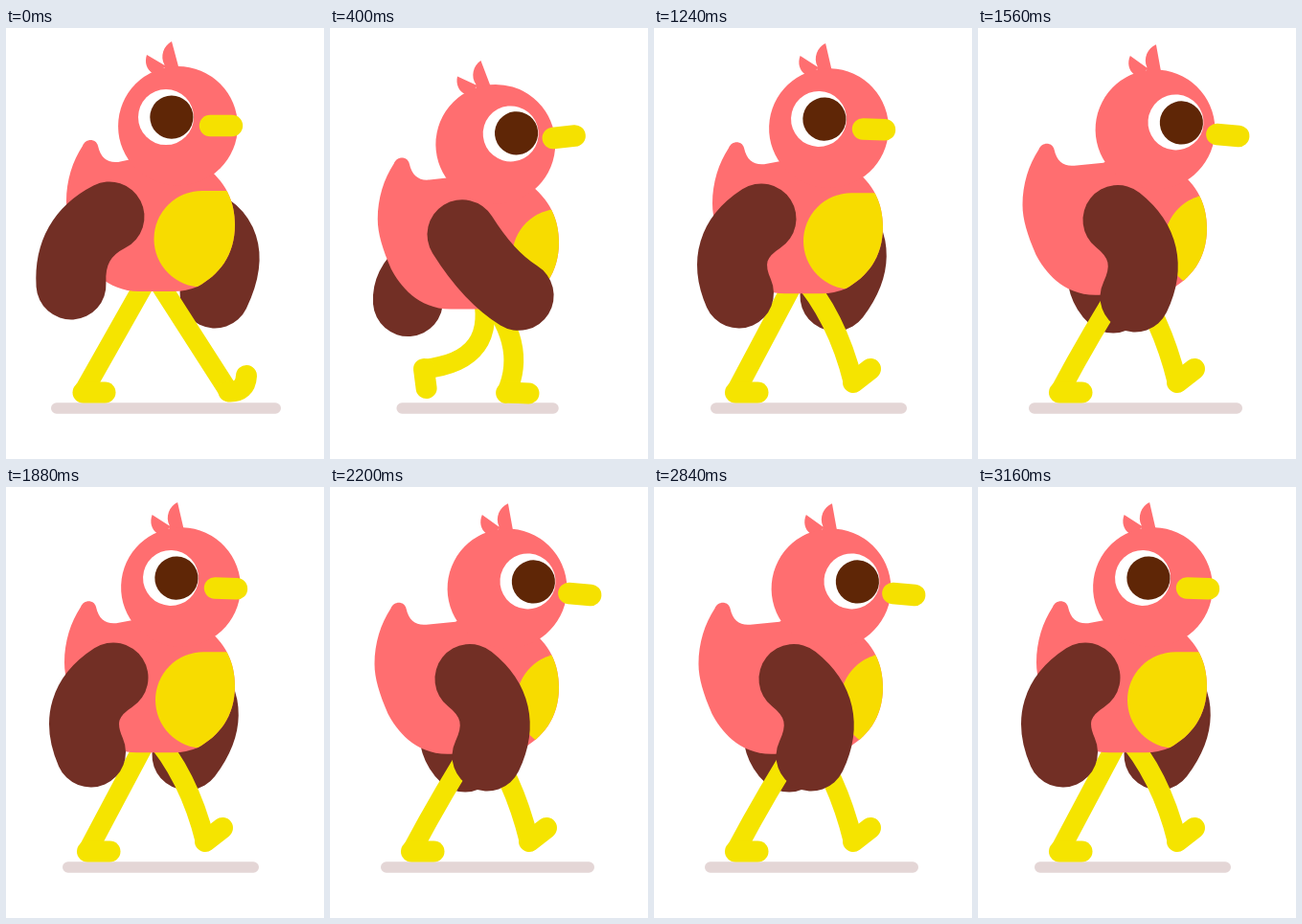
An HTML page for the animation above (3.2 s loop, 332 by 450 pixels).

```html
<!DOCTYPE html>
<html lang="en">
<head>
<meta charset="utf-8">
<title>Walking bird</title>
<style>
  html, body { margin: 0; width: 100%; height: 100%; overflow: hidden; background: #fff; }
  svg { display: block; width: 100vw; height: 100vh; }
  .line { fill: none; stroke-linecap: round; stroke-linejoin: round; }
  .wing { stroke: #722f25; stroke-width: 73; }
  .leg { stroke: #f5e400; stroke-width: 20.5; }
  .foot { stroke: #f5e400; stroke-width: 22; }
  .pink { fill: #ff6e70; }
</style>
</head>
<body>
<svg viewBox="0 0 332 450">
  <clipPath id="torsoClip"><path id="torsoEdge"/></clipPath>
  <rect id="shadow" y="391.3" height="11.4" rx="5.7" fill="#e4d6d6"/>
  <path id="farWing" class="line wing"/>
  <path id="legA" class="line leg"/><path id="footA" class="line foot"/>
  <path id="legB" class="line leg"/><path id="footB" class="line foot"/>
  <g id="body">
    <path id="torso" class="pink"/>
    <g clip-path="url(#torsoClip)">
      <rect id="belly" y="170" width="180" height="100.5" rx="50.2" fill="#f7dc00"/>
    </g>
  </g>
  <path id="nearWing" class="line wing"/>
  <g id="head">
    <path class="pink" d="M-6.5-88.5 1.7-58-14-58V-64C-19-73-15-84-6.5-88.5Z
      M-32.5-74.5-13-63-22-52-26-55C-33-59-35-67-32.5-74.5Z"/>
    <circle class="pink" r="62.4"/>
    <g id="eye">
      <circle cy="-9.3" r="29" fill="#fff"/>
      <circle cx="5.9" cy="-9.3" r="22.6" fill="#5f2606"/>
    </g>
    <rect id="beak" x="-22.7" y="-11.7" width="45.4" height="22.6" rx="11.3" fill="#f5e100"/>
  </g>
</svg>
<script>
const CYCLE = 640, STEP = 40;
const POSES = [0, 120, 280, 600];
const $ = id => document.getElementById(id);
const set = (id, attrs) => {
  for (const k in attrs) $(id).setAttribute(k, attrs[k]);
};

// Harmonics: a bounce repeats with each step, a swing with each pair of steps.
const angle = t => t / CYCLE * 2 * Math.PI;
const bounceBasis = t => [1, Math.cos(angle(t)), Math.cos(2 * angle(t)), Math.sin(2 * angle(t))];
const swingBasis = t => [1, Math.cos(angle(t)), Math.sin(angle(t)), Math.cos(2 * angle(t))];

function solve(rows) {
  const n = rows.length;
  for (let i = 0; i < n; i++) {
    let p = i;
    for (let j = i + 1; j < n; j++) if (Math.abs(rows[j][i]) > Math.abs(rows[p][i])) p = j;
    [rows[i], rows[p]] = [rows[p], rows[i]];
    rows[i] = rows[i].map(v => v / rows[i][i]);
    for (let j = 0; j < n; j++) {
      if (j === i) continue;
      const f = rows[j][i];
      rows[j] = rows[j].map((v, k) => v - f * rows[i][k]);
    }
  }
  return rows.map(r => r[n]);
}

// A smooth wave through the values at the four POSES.
const wave = basis => (...vals) => {
  const w = solve(POSES.map((t, i) => [...basis(t), vals[i]]));
  return t => basis(t).reduce((sum, b, i) => sum + b * w[i], 0);
};
const bounce = wave(bounceBasis), swing = wave(swingBasis);

// Periodic Hermite curve through rows of [time, ...values].
function track(keys) {
  const n = keys.length;
  const key = i => {
    const lap = Math.floor(i / n), k = keys[i - lap * n];
    return [k[0] + lap * CYCLE, ...k.slice(1)];
  };
  return time => {
    const t = time % CYCLE;
    let i = n - 1;
    while (keys[i][0] > t) i--;
    const [a, b, c, d] = [key(i - 1), key(i), key(i + 1), key(i + 2)];
    const h = c[0] - b[0], u = (t - b[0]) / h, v = 1 - u;
    return b.slice(1).map((_, j) => {
      const k = j + 1;
      const m0 = (c[k] - a[k]) / (c[0] - a[0]) * h;
      const m1 = (d[k] - b[k]) / (d[0] - b[0]) * h;
      return b[k] * (1 + 2 * u) * v * v + m0 * u * v * v + c[k] * u * u * (3 - 2 * u) - m1 * u * u * v;
    });
  };
}

const bodyY = bounce(0, 27, 3.7, 2.2);
const tailX = bounce(0, -6, -16.5, -2);
const bellyX = bounce(154.5, 167.5, 194.5, 156);
const hipX = bounce(152, 153, 157, 151);
const headX = bounce(179.5, 170.5, 185, 182.5);
const headY = bounce(102.4, 130, 106, 104.6);
const headTilt = bounce(0, -9, 4.8, 2);
const eyeX = bounce(-12.5, -1.2, 20.8, -10.8);
const beakX = bounce(45, 55.5, 76, 47);

// Shoulder, bend and tip of each wing.
const nearWing = [
  [bounce(108, 120, 146, 112), bounce(197, 224, 200.5, 199)],
  [swing(65, 126, 187, 67), bounce(219, 281, 233, 228)],
  [swing(68, 69.5, 164, 88.5), bounce(268, 289, 281, 277)]
];
const farWing = [
  [bounce(193, 183, 155, 190), bounce(200, 226, 203, 202)],
  [swing(247, 208, 113, 223), bounce(217, 262, 255, 235)],
  [swing(218, 242, 141, 189), bounce(277, 290, 282, 280)]
];

// Time, ankle, knee bend, toe, curl of the foot.
const leg = track([
  [0, 232.5, 379.5, 192.5, 317, 251, 363, .5],
  [40, 211, 380.5, 203, 322, 234, 379, .05],
  [120, 159, 381, 204, 333, 182, 381, 0],
  [280, 85, 380.5, 118, 318, 108.5, 380.5, 0],
  [320, 80.5, 380.5, 116, 318, 103.5, 380.5, 0],
  [440, 113, 349, 200, 354, 110, 373, 0],
  [600, 208, 370, 191, 301, 226, 356, 0]
]);

// Time, left and right end of the shadow.
const shadow = track([
  [0, 47, 287], [120, 79, 223], [280, 53, 276],
  [320, 41, 289], [440, 79, 223], [600, 59, 264]
]);

const curve = (a, b, c) => `M${a}Q${b} ${c}`;

function drawLeg(name, t, hip) {
  const [ax, ay, kx, ky, tx, ty, curl] = leg(t);
  const dx = tx - ax, dy = ty - ay;
  const arch = [(ax + tx) / 2 - dy * curl, (ay + ty) / 2 + dx * curl];
  set('leg' + name, { d: curve(hip, [kx, ky], [ax, ay]) });
  set('foot' + name, { d: curve([ax, ay], arch, [tx, ty]) });
}

function torsoPath(s) {
  const x = v => v + s;
  return `M206 143C230 160 239 182 239 205C239 238 222 258 200 270Q188 275 175 275L${x(139)} 275` +
    `C${x(105)} 275 ${x(86)} 250 ${x(77)} 233C${x(68)} 212 ${x(63)} 196 ${x(63)} 181` +
    `C${x(63)} 159 ${x(69.5)} 139 ${x(80)} 123C${x(83)} 115 ${x(94)} 115 ${x(96)} 123` +
    `C${x(99)} 136 ${x(106)} 141 ${x(117)} 140L131 137L175 110Z`;
}

function draw(t) {
  const at = f => f(t);
  const wing = w => curve(...w.map(p => p.map(at)));
  const y = bodyY(t), hip = [hipX(t), 254 + y];
  const [left, right] = shadow(t);
  const d = torsoPath(tailX(t));

  set('shadow', { x: left, width: right - left });
  set('farWing', { d: wing(farWing) });
  drawLeg('A', t, hip);
  drawLeg('B', t + CYCLE / 2, hip);
  set('body', { transform: `translate(0 ${y})` });
  set('torso', { d });
  set('torsoEdge', { d });
  set('belly', { x: bellyX(t) });
  set('nearWing', { d: wing(nearWing) });
  set('head', { transform: `translate(${headX(t)} ${headY(t)}) rotate(${headTilt(t)})` });
  set('eye', { transform: `translate(${eyeX(t)} 0)` });
  set('beak', { transform: `translate(${beakX(t)} 0)` });
}

function tick() {
  draw(Math.floor(performance.now() / STEP) * STEP % CYCLE);
  requestAnimationFrame(tick);
}
tick();
</script>
</body>
</html>
```
